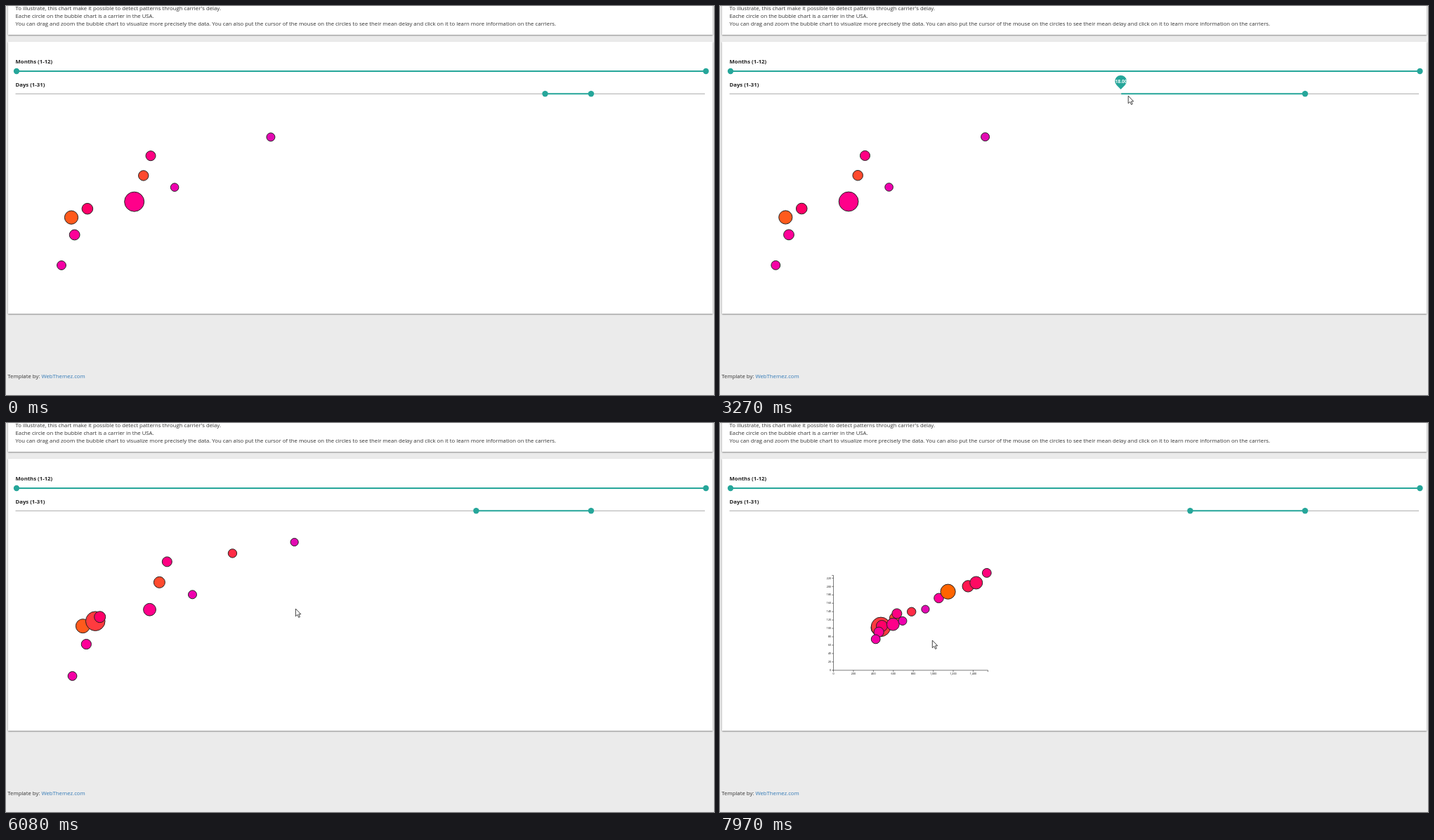
An HTML page with a canvas for the animation above (8 s loop, 1008 by 555 pixels).

```html
<!DOCTYPE html>
<html lang="en">
<head>
<meta charset="utf-8">
<title>Carrier delays</title>
<style>
html, body { margin: 0; width: 100%; height: 100%; overflow: hidden; background: #ebebeb; }
.stage { position: absolute; left: 0; top: 0; width: 1008px; height: 555px; overflow: hidden; }
.card { position: absolute; left: 2.5px; width: 1003.5px; background: #fff; box-shadow: 0 1px 2px rgba(0,0,0,.42); }
svg, canvas { position: absolute; left: 0; top: 0; }
text { font: 7.78px "Open Sans", sans-serif; fill: #333; }
.bold { font-weight: 700; fill: #222; }
.link { fill: #337ab7; }
</style>
</head>
<body>
<div class="stage">
  <div class="card" style="top:-20px;height:61px"></div>
  <div class="card" style="top:50.5px;height:388.5px"></div>
  <svg width="1008" height="555">
    <text x="13.5" y="5.5">To illustrate, this chart make it possible to detect patterns through carrier's delay.</text>
    <text x="13.5" y="16.7">Eache circle on the bubble chart is a carrier in the USA.</text>
    <text x="13.5" y="27.8">You can drag and zoom the bubble chart to visualize more precisely the data. You can also put the cursor of the mouse on the circles to see their mean delay and click on it to learn more information on the carriers.</text>
    <text class="bold" x="13.5" y="82.3">Months (1-12)</text>
    <text class="bold" x="13.5" y="114.7">Days (1-31)</text>
    <text x="2.3" y="530.5">Template by: <tspan class="link">WebThemez.com</tspan></text>
  </svg>
  <canvas id="view" width="1008" height="555"></canvas>
</div>
<script>
const ctx = document.getElementById('view').getContext('2d');
const LOOP = 8000, TEAL = '#26a69a', TAU = Math.PI * 2;
const ZOOM_X = 326, ZOOM_Y = 289;
const WHEEL = [6290, 6360, 6430, 6870, 6930, 7000, 7080, 7150, 7220];

// colour, x, y, radius at each data stage; drawn in this order
const BUBBLES = [
  ['#ff5a1c', 112, 289, 9.6, 11, 10.5, 10],
  ['#ff3b3f', 130, 282, 0, 12.8, 14, 13.8],
  ['#ff0068', 136.5, 276, 7.8, 9, 8.2, 8],
  ['#ff0098', 117, 315, 7.4, 7.3, 7.3, 7.1],
  ['#ff4a2e', 222, 226.5, 7.2, 12.3, 9.3, 8],
  ['#ff008a', 208, 265.5, 14, 6.9, 7.9, 8.9],
  ['#ff0082', 233, 197, 7, 7.3, 7.4, 7],
  ['#f500a5', 97, 360.5, 6.4, 8.8, 7.5, 6.4],
  ['#ee00ae', 269.5, 244, 5.8, 6.1, 6.3, 6],
  ['#ff2c46', 327, 185, 0, 10.4, 7.7, 6.2],
  ['#e20ab2', 416, 169, 6, 5.8, 5.8, 5.6],
  ['#ff0098', 502, 98, 6.8, 6.8, 6.8, 6.8],
  ['#ff6400', 561, 57, 10.6, 10.6, 10.6, 10.6],
  ['#ff1850', 690, 22, 8.2, 8.2, 8.2, 8.2],
  ['#ff0a62', 742, 0, 9, 9, 9, 9],
  ['#ff007c', 810, -63, 6.4, 6.4, 6.4, 6.4]
];

// scale domain per data stage: x offset, x factor, y offset, y factor
const FIT = [
  [-11.6, .934, 25.5, .9556],
  [4.2, 1.0235, -4.3, 1.0078],
  [0, 1, 0, 1],
  [-1.6, .991, 1.4, .9975]
];
const STAGE = [[3230, 0], [3850, 1], [4420, 1], [5210, 2], [5520, 3]];
const PAN = [[7390, 0, 0], [7590, -9, 2], [7970, -52.5, 3.3]];
const MOUSE = [
  [150, 791, 537], [300, 848, 510], [430, 865, 485], [620, 837, 451],
  [950, 837, 451], [1300, 818, 310], [1550, 787, 190], [1710, 773, 150],
  [1780, 771, 148], [1940, 762, 128], [2100, 762, 127], [2420, 762, 127],
  [2850, 755, 128], [3050, 670, 128], [3200, 584, 128], [3500, 571, 129],
  [4290, 571, 129], [4600, 620, 130], [5000, 677, 131], [5690, 677, 131],
  [5850, 600, 175], [6050, 430, 260], [6230, 326, 289], [7230, 326, 289],
  [7370, 355, 312], [7390, 355, 312], [7590, 346, 314], [7970, 302, 310]
];
const CURSOR = [[0, 0], [0, 10.8], [2.5, 8.5], [4.3, 12.4], [6, 11.7], [4.3, 7.8], [7.5, 7.8]];

const mix = (a, b, p) => a + (b - a) * p;
const clamp = p => Math.max(0, Math.min(1, p));

// value of a keyed track at time t
function track(keys, t) {
  if (t <= keys[0][0]) return keys[0].slice(1);
  for (let i = 1; i < keys.length; i++) {
    const a = keys[i - 1], b = keys[i];
    if (t < b[0]) {
      const p = (t - a[0]) / (b[0] - a[0]);
      return a.slice(1).map((v, j) => mix(v, b[j + 1], p));
    }
  }
  return keys[keys.length - 1].slice(1);
}

function line(x1, y1, x2, y2) {
  ctx.beginPath();
  ctx.moveTo(x1, y1);
  ctx.lineTo(x2, y2);
  ctx.stroke();
}

function disc(x, y, r) {
  ctx.beginPath();
  ctx.arc(x, y, r, 0, TAU);
  ctx.fill();
}

function bar(x1, x2, y, width, color) {
  ctx.lineWidth = width;
  ctx.strokeStyle = color;
  line(x1, y, x2, y);
}

const dayX = day => 15 + (day - 1) * 32.72;

function drawPin(x, grow, day) {
  if (grow <= 0) return;
  ctx.save();
  ctx.translate(x - .6, 125.2 - 18 * grow);
  ctx.scale(grow, grow);
  ctx.beginPath();
  ctx.arc(0, 0, 8.3, Math.PI * .75, Math.PI * .25);
  ctx.lineTo(0, 11.7);
  ctx.closePath();
  ctx.fill();
  ctx.clip();
  ctx.fillStyle = '#fff';
  ctx.font = '700 6.5px "Open Sans", sans-serif';
  ctx.textAlign = 'left';
  ctx.fillText(day + '.00', -7.9, 2.5);
  ctx.restore();
}

function drawSliders(t, mouseX) {
  bar(15, 996, 93, 2, TEAL);
  ctx.fillStyle = TEAL;
  disc(15, 93, 4.2);
  disc(996.5, 93, 4.2);

  let day = t < 2420 ? 24 : 21;
  if (t >= 2420 && t < 5690) day = Math.round((mouseX - 10) / 32.72) + 1;
  const x = dayX(day), end = dayX(26);
  const grow = t < 5000 ? clamp((t - 3000) / 270) : 1 - clamp((t - 5700) / 250);
  bar(13.5, 995, 125.3, 1.3, '#bbb');
  bar(x, end, 125.2, 2, TEAL);
  ctx.fillStyle = TEAL;
  disc(end, 125.2, 4.2);
  if (grow < 1) disc(x, 125.2, 4.2 * (1 - grow));
  drawPin(x, grow, day);
}

function drawAxes(x, y, k) {
  ctx.save();
  ctx.translate(x, y);
  ctx.scale(k, k);
  ctx.strokeStyle = ctx.fillStyle = '#000';
  ctx.lineWidth = 2.3;
  ctx.font = '16.5px "Open Sans", sans-serif';
  line(0, 0, 983, 0);
  line(983, 0, 983, 10);
  line(0, 0, 0, -605);
  line(0, -605, -10, -605);
  ctx.textAlign = 'center';
  for (let i = 0; i < 8; i++) {
    line(i * 127, 0, i * 127, 10);
    ctx.fillText((i * 200).toLocaleString('en-US'), i * 127, 26.5);
  }
  ctx.textAlign = 'right';
  for (let i = 0; i < 12; i++) {
    line(0, -i * 53.4, -10, -i * 53.4);
    ctx.fillText(i * 20, -15, -i * 53.4 + 5.5);
  }
  ctx.restore();
}

function drawChart(t) {
  const [stage] = track(STAGE, t);
  const from = Math.min(2, Math.floor(stage));
  const raw = stage - from;
  const p = from === 0 ? raw * raw * (3 - 2 * raw) : raw;
  const [ax, bx, ay, by] = FIT[from].map((v, i) => mix(v, FIT[from + 1][i], p));
  const k = 2 ** (-.24 * WHEEL.filter(w => t >= w).length);
  const [dx, dy] = track(PAN, t);
  const viewX = x => ZOOM_X + (x - ZOOM_X) * k + dx;
  const viewY = y => ZOOM_Y + (y - ZOOM_Y) * k + dy;

  ctx.save();
  ctx.beginPath();
  ctx.rect(16, 148, 442.5, 278);
  ctx.clip();
  drawAxes(viewX(-174.5), viewY(559.3), k);
  ctx.strokeStyle = '#222';
  ctx.lineWidth = 1;
  for (const [color, x, y, ...radii] of BUBBLES) {
    const r = mix(radii[from], radii[from + 1], p);
    if (r < .3) continue;
    ctx.fillStyle = color;
    disc(viewX(ax + bx * x), viewY(ay + by * y), r);
    ctx.stroke();
  }
  ctx.restore();
}

function drawCursor(x, y) {
  ctx.save();
  ctx.translate(x + .3, y);
  ctx.beginPath();
  CURSOR.forEach(([px, py]) => ctx.lineTo(px, py));
  ctx.closePath();
  ctx.fillStyle = '#fff';
  ctx.fill();
  ctx.strokeStyle = '#333';
  ctx.lineWidth = .9;
  ctx.stroke();
  ctx.restore();
}

function draw(t) {
  ctx.clearRect(0, 0, 1008, 555);
  const [x, y] = track(MOUSE, t);
  drawSliders(t, x);
  drawChart(t);
  if (t >= 150) drawCursor(x, y);
}

const start = performance.now();
function tick() {
  draw((performance.now() - start) % LOOP);
  requestAnimationFrame(tick);
}
tick();
</script>
</body>
</html>
```
